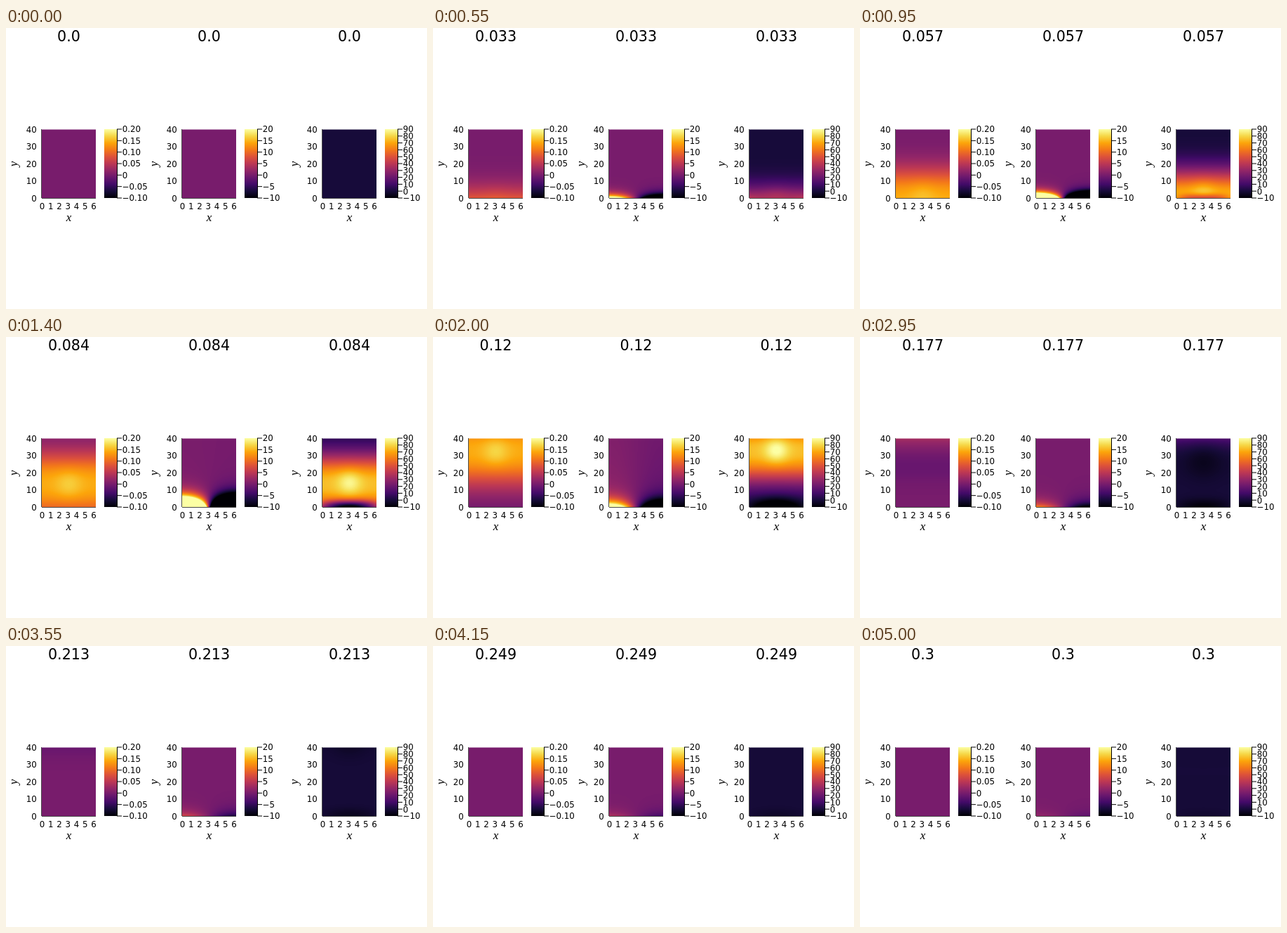
An HTML page with a canvas that plays this animation: 600x400 px, repeating every 5.05 s.

```html
<!DOCTYPE html>
<html lang="en">
<head>
<meta charset="utf-8">
<title>Three fields</title>
<style>
  html, body { margin: 0; width: 100%; height: 100%; overflow: hidden; background: #fff; }
  canvas, svg { position: absolute; left: 0; top: 0; width: 600px; height: 400px; }
  text { font-family: "DejaVu Sans", sans-serif; font-size: 11.8px; fill: #000; }
  .title { font-size: 20.65px; }
  .math { font: italic 17px "Liberation Serif", serif; }
  .mid { text-anchor: middle; }
  .end { text-anchor: end; }
  line { stroke: #000; stroke-width: 1; }
  .axis { opacity: .7; }
</style>
</head>
<body>
<canvas id="fields" width="600" height="400"></canvas>
<svg id="plot" viewBox="0 0 600 400"></svg>
<script>
const STEP = 50, STEPS = 101, DT = 0.003;
const LEFT = 51, TOP = 144, W = 77, H = 98, BOTTOM = TOP + H, GAP = 200;
const { exp, log, sin, cos, sqrt, abs, PI, min, max, pow } = Math;

const svg = document.getElementById('plot');
const ctx = document.getElementById('fields').getContext('2d');

function add(name, attrs, text) {
  const el = document.createElementNS('http://www.w3.org/2000/svg', name);
  for (const key in attrs) el.setAttribute(key, attrs[key]);
  if (text !== undefined) el.textContent = text;
  svg.appendChild(el);
  return el;
}
const line = (x1, y1, x2, y2, cls = '') => add('line', { x1, y1, x2, y2, class: cls });

// Inferno colour map
const stops = ['000004', '160b39', '420a68', '6a176e', '932667', 'bc3754',
  'dd513a', 'f37819', 'fca50a', 'f6d746', 'fcffa4']
  .map(h => [0, 2, 4].map(i => parseInt(h.slice(i, i + 2), 16)));
const palette = Array.from({ length: 256 }, (_, i) => {
  const p = i / 255 * 10, k = min(9, p | 0);
  return stops[k].map((c, j) => c + (stops[k + 1][j] - c) * (p - k));
});

// Interpolates [time, value] keys, on a log scale
function track(keys, t) {
  let i = 1;
  while (i < keys.length - 1 && t > keys[i][0]) i++;
  const [a, u] = keys[i - 1], [b, v] = keys[i];
  const f = min(1, max(0, (t - a) / (b - a)));
  return exp(log(u) + (log(v) - log(u)) * f);
}
const bell = (d, w) => exp(-(d / w) * (d / w));

const lobeSize = [[0, .4], [.03, 25], [.057, 85], [.084, 135], [.12, 30], [.177, 12], [.249, 4], [.3, 2]];
const lobeReach = [[0, 2], [.057, 2], [.084, 3.2], [.12, 3.6], [.177, 3.2], [.3, 3]];
const layerSize = [[0, .3], [.03, 5], [.057, 32], [.084, 62], [.12, 20], [.177, 9], [.249, 3], [.3, 2]];
const layerReach = [[0, 1.5], [.057, 2.5], [.084, 3.6], [.12, 5], [.3, 4]];

function state(t) {
  const front = 13.3 + 540 * (t - .084);
  return {
    front,
    core: front / 2 + sqrt(front * front / 4 + 14),
    rise: 1 - bell(t, .012),
    swell: 1 - bell(t, .07),
    lobe: track(lobeSize, t) * (1 - bell(t, .004)),
    reach: track(lobeReach, t),
    drift: 1.6 * bell(t - .12, .03),
    layer: track(layerSize, t) * (1 - bell(t, .004)),
    depth: track(layerReach, t)
  };
}
const pulse = (d, w) => exp(-pow(abs(d) / w, 2.3));

function wave(x, y, s) {
  const d = y - s.front;
  return s.rise * .143 * pulse(d, d > 0 ? 18.5 : 20)
    + s.swell * (.028 * bell(x - PI, 1.5) * bell(y - s.core + 1, 8)
    - .013 * bell(d + 39, 10));
}
function lobes(x, y, s) {
  return cos(x / 2) * (s.lobe * exp(-y / s.reach) + s.drift * exp(-y / 40));
}
function flow(x, y, s) {
  const d = y - s.front, mid = sin(x / 2);
  return s.rise * 75 * pulse(d, d > 0 ? 17.8 : 19)
    + s.swell * (17 * bell(x - PI, 1.4) * bell(y - s.core, 7.5)
    - (2 + 4 * mid * mid) * bell(d + 36, 11))
    - s.layer * (.25 + .75 * mid) * bell(y, s.depth);
}

const panels = [
  { field: wave, lo: -.1, hi: .2, labels: ['−0.10', '−0.05', '0', '0.05', '0.10', '0.15', '0.20'] },
  { field: lobes, lo: -10, hi: 20, labels: ['−10', '−5', '0', '5', '10', '15', '20'] },
  { field: flow, lo: -10, hi: 90, labels: ['−10', '0', '10', '20', '30', '40', '50', '60', '70', '80', '90'] }
];

const defs = add('linearGradient', { id: 'bar', x1: 0, y1: 1, x2: 0, y2: 0 });
stops.forEach((c, i) => defs.appendChild(
  add('stop', { offset: i / 10, 'stop-color': `rgb(${c})` })));

panels.forEach((p, n) => {
  const x0 = LEFT + n * GAP, bar = x0 + 89, mid = x0 + 38.5;
  p.left = x0;
  p.image = ctx.createImageData(W, H);
  p.title = add('text', { x: mid, y: 18.7, class: 'title mid' });

  line(x0 - .5, TOP, x0 - .5, BOTTOM, 'axis');
  line(x0, BOTTOM + .5, x0 + W, BOTTOM + .5, 'axis');
  for (let i = 0; i <= 6; i++) {
    add('text', { x: x0 + i * W / (2 * PI) + .5, y: 258, class: 'mid' }, i);
  }
  for (let i = 0; i <= 4; i++) {
    add('text', { x: x0 - 7.3, y: BOTTOM - i * H / 4 + 4.6, class: 'end' }, i * 10);
  }
  add('text', { x: mid, y: 275, class: 'math mid' }, 'x');
  add('text', { class: 'math mid', transform: `translate(${x0 - 35.5} 193.5) rotate(-90)` }, 'y');

  add('rect', { x: bar, y: TOP, width: 18, height: H, fill: 'url(#bar)' });
  line(bar + 18.5, TOP, bar + 18.5, BOTTOM);
  p.labels.forEach((s, i) => {
    const y = BOTTOM - i * H / (p.labels.length - 1);
    line(bar + 18, y, bar + 25, y);
    add('text', { x: bar + 25.7, y: y + 4.4 }, s);
  });
});

function paint(p, s) {
  const px = p.image.data;
  for (let j = 0, k = 0; j < H; j++) {
    const y = 40 * (1 - (j + .5) / H);
    const alpha = j ? 255 : 128; // the top edge covers half a pixel
    for (let i = 0; i < W; i++, k += 4) {
      const v = (p.field(2 * PI * (i + .5) / W, y, s) - p.lo) / (p.hi - p.lo);
      const c = palette[Math.round(255 * min(1, max(0, v)))];
      px[k] = c[0]; px[k + 1] = c[1]; px[k + 2] = c[2]; px[k + 3] = alpha;
    }
  }
  ctx.putImageData(p.image, p.left, TOP);
}

let shown = -1;
function draw(now) {
  const step = Math.floor(now / STEP) % STEPS;
  if (step !== shown) {
    shown = step;
    const t = step * DT, s = state(t);
    const label = step ? String(+t.toFixed(3)) : '0.0';
    for (const p of panels) {
      p.title.textContent = label;
      paint(p, s);
    }
  }
  requestAnimationFrame(tick);
}
const start = performance.now();
function tick() { draw(performance.now() - start); }
tick();
</script>
</body>
</html>
```
